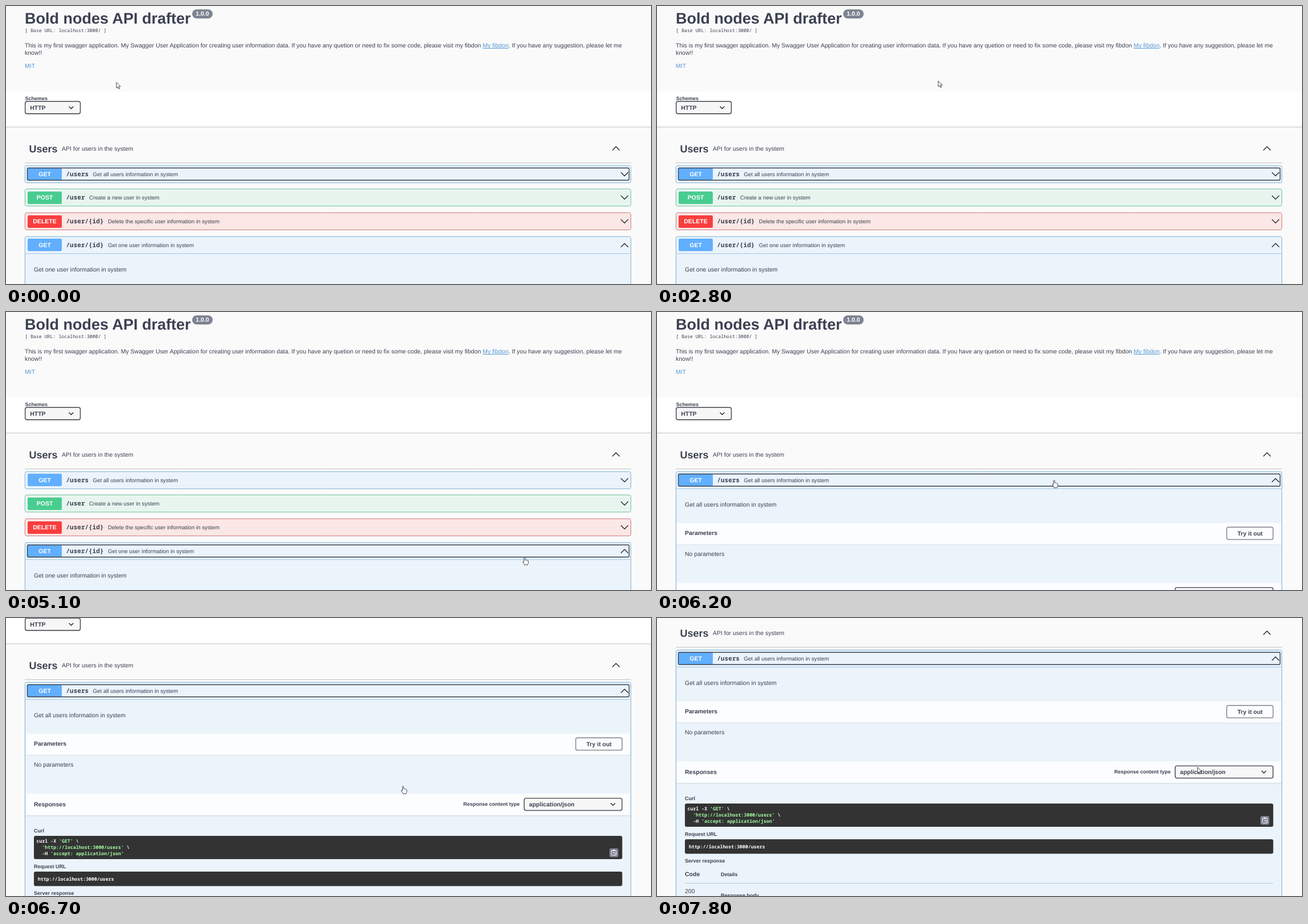
Recreate the animation shown at these times as an HTML page with a canvas. Size 1133 by 490 pixels, loop 8 s.

```html
<!DOCTYPE html>
<html lang="en">
<head>
<meta charset="utf-8">
<title>Users API</title>
<style>
  html, body { margin: 0; width: 100%; height: 100%; overflow: hidden; background: #fafafa; }
  canvas { display: block; }
</style>
</head>
<body>
<canvas id="stage" width="1133" height="490"></canvas>
<script>
const ctx = document.getElementById('stage').getContext('2d');
const LOOP = 8000, TICK = 100;
const SANS = '"Liberation Sans", Arial, sans-serif';
const MONO = '"Noto Sans Mono", "DejaVu Sans Mono", monospace';
const INK = '#3b4151', LINK = '#5597d6', CODE = '#a2fca2', DARK = '#333333';
const LEFT = 33.5, RIGHT = 1097.5, LIST_TOP = 281, ROW_STEP = 41.75;

const COLORS = {
  GET: ['#61affe', '#ebf3fb', '#82bbe0'],
  POST: ['#49cc90', '#e8f5ef', '#74cba5'],
  DELETE: ['#f93e3e', '#fbe7e5', '#d97f80']
};
const ROWS = [
  ['GET', '/users', 'Get all users information in system'],
  ['POST', '/user', 'Create a new user in system'],
  ['DELETE', '/user/{id}', 'Delete the specific user information in system'],
  ['GET', '/user/{id}', 'Get one user information in system']
];

// Each pointer move: start and end time, then where it comes to rest
const REST = { x: 194, y: 134.5 };
const MOVES = [
  { from: 100, to: 600, x: 84, y: 328 },
  { from: 700, to: 1500, x: 475.5, y: 86 },
  { from: 1900, to: 2400, x: 494, y: 132 },
  { from: 3000, to: 4700, x: 911, y: 432 },
  { from: 5500, to: 5800, x: 697.5, y: 296 },
  { from: 7100, to: 7800, x: 949.5, y: 263 }
];

const progress = (t, from, to) => Math.min(1, Math.max(0, (t - from) / (to - from)));
const smooth = p => p * p * (3 - 2 * p);
const mix = (a, b, p) => a + (b - a) * p;

const scrollAt = t => 225 * (1 - (1 - progress(t, 6200, 7000)) ** 1.4);

function pointerAt(t) {
  return MOVES.reduce((p, m) => {
    const k = smooth(progress(t, m.from, m.to));
    return { x: mix(p.x, m.x, k), y: mix(p.y, m.y, k) };
  }, REST);
}

// y is the middle of the capitals; returns the x where the text ends
function text(str, x, y, size, { bold, mono, color = INK, align = 'left' } = {}) {
  ctx.font = `${bold ? 'bold ' : ''}${size}px ${mono ? MONO : SANS}`;
  ctx.fillStyle = color;
  ctx.textAlign = align;
  ctx.fillText(str, x, Math.round(y + size * 0.358));
  return x + ctx.measureText(str).width;
}

function box(x, y, w, h, r, fill, stroke, line = 1) {
  ctx.beginPath();
  ctx.roundRect(x, y, w, h, r);
  if (fill) { ctx.fillStyle = fill; ctx.fill(); }
  if (stroke) { ctx.strokeStyle = stroke; ctx.lineWidth = line; ctx.stroke(); }
}

function shadowed(alpha, blur, dy, draw) {
  ctx.save();
  ctx.shadowColor = `rgba(0,0,0,${alpha})`;
  ctx.shadowBlur = blur;
  ctx.shadowOffsetY = dy;
  draw();
  ctx.restore();
}

function rule(x1, x2, y, color) {
  ctx.fillStyle = color;
  ctx.fillRect(x1, y, x2 - x1, 1);
}

function chevron(x, y, w, up) {
  const h = (up ? -w : w) / 4;
  ctx.beginPath();
  ctx.moveTo(x - w / 2, y - h);
  ctx.lineTo(x, y + h);
  ctx.lineTo(x + w / 2, y - h);
  ctx.strokeStyle = '#20242c';
  ctx.lineWidth = 1.4;
  ctx.lineCap = ctx.lineJoin = 'round';
  ctx.stroke();
}

function select(label, x, y, w) {
  shadowed(0.2, 2, 1, () => box(x, y, w, 21.5, 3, '#f7f7f7'));
  box(x, y, w, 21.5, 3, null, '#41444e', 1.4);
  text(label, x + 8.5, y + 10.6, 10.5, { bold: true });
  chevron(x + w - 16, y + 11, 7, false);
}

function header() {
  const end = text('Bold nodes API drafter', 33, 21.6, 27, { bold: true });
  box(end + 2.5, 6, 36, 16, 8, '#7d8492');
  text('1.0.0', end + 20.5, 13.6, 10.5, { bold: true, color: '#fff', align: 'center' });
  text('[ Base URL: localhost:3000/ ]', 33, 43.2, 8.25, { mono: true });

  const x = text('This is my first swagger application. My Swagger User Application for creating user ' +
    'information data. If you have any quetion or need to fix some code, please visit my fibdon ', 33, 69.2, 10.5);
  const x2 = text('My fibdon', x, 69.2, 10.5, { color: LINK });
  rule(x, x2, 74, LINK);
  text('. If you have any suggestion, please let me', x2, 69.2, 10.5);
  text('know!!', 33, 81.8, 10.5);
  text('MIT', 33, 105.6, 10.5, { color: LINK });

  shadowed(0.15, 1, 1, () => {
    ctx.fillStyle = '#fff';
    ctx.fillRect(-10, 151, 1153, 61.5);
  });
  text('Schemes', 33.5, 162.8, 9, { bold: true });
  select('HTTP', 33.7, 168.3, 96.8);

  text('Users', 40.5, 252, 18, { bold: true });
  text('API for users in the system', 98, 251.6, 10.5);
  chevron(1071.5, 251, 12, true);
  rule(33, 1098, 276, '#c0c1c5');
}

function row([method, path, note], top, { open, focus }) {
  const [main, tint, edge] = COLORS[method];
  const y = Math.floor(top), inner = Math.round(top + 4);
  const h = open ? 800 : 30, w = RIGHT - LEFT;
  shadowed(0.15, 3, 0, () => box(LEFT, y + 0.5, w, h, 3, '#fafafa'));
  box(LEFT, y + 0.5, w, h, 3, tint, edge);
  if (open) rule(LEFT, RIGHT, y + 30, '#9fc9ea');
  box(38, inner, 60, 22, 2, main);
  text(method, 68, y + 14.9, 10.5, { bold: true, color: '#fff', align: 'center' });
  const end = text(path, 105.5, y + 15.4, 11, { bold: true, mono: true });
  text(note, end + 7.4, y + 15.3, 9.75);
  chevron(1086.5, y + 15.5, 12, open);
  if (focus) box(37.5, inner + 0.5, 1057, 21.5, 2, null, '#37414f', 1.4);
  if (open) text(note, 49, y + 58, 10.5);
}

function bar(label, y) {
  shadowed(0.1, 2, 1, () => {
    ctx.fillStyle = '#fbfdfe';
    ctx.fillRect(LEFT + 0.5, y, RIGHT - LEFT - 1, 38);
  });
  text(label, 49, y + 18.3, 10.5, { bold: true });
}

function codeLine(parts, y) {
  parts.reduce((x, part) => text(part, x, y, 8.25, {
    bold: true, mono: true, color: part[0] === "'" ? CODE : '#fff'
  }), 53.5);
}

function clipboard(x, y) {
  box(x, y, 15.6, 15.6, 3, '#7d8293');
  box(x + 3.6, y + 3.8, 8.4, 8.6, 1, null, '#f2f3f5');
  box(x + 5.6, y + 2.4, 4.4, 2.6, 1, '#f2f3f5');
  rule(x + 5.5, x + 10, y + 7, '#f2f3f5');
  rule(x + 7.5, x + 13, y + 9.3, '#f2f3f5');
}

function details() {
  const bold = { bold: true };
  bar('Parameters', 371.4);
  shadowed(0.1, 2, 1, () => box(1000.8, 379.3, 81.4, 21.6, 3, '#fbfdfe'));
  box(1000.8, 379.3, 81.4, 21.6, 3, null, '#808288', 1.4);
  text('Try it out', 1041.7, 390.2, 10.5, { bold: true, align: 'center' });
  text('No parameters', 49, 426, 10.5);

  bar('Responses', 477.6);
  text('Response content type', 803.3, 496.2, 9, bold);
  select('application/json', 910.3, 485.6, 171.8);

  text('Curl', 49, 543.2, 9, bold);
  box(49, 552, 1033.5, 41, 3, DARK);
  codeLine(['curl -X ', "'GET'", ' \\'], 561.5);
  codeLine(['  ', "'http://localhost:3000/users'", ' \\'], 572.4);
  codeLine(['  -H ', "'accept: application/json'"], 583.2);
  clipboard(1060, 574);

  text('Request URL', 49, 605.6, 9, bold);
  box(49, 615, 1033.5, 25.5, 3, DARK);
  text('http://localhost:3000/users', 56, 627.6, 8.25, { bold: true, mono: true, color: '#fff' });

  text('Server response', 49, 653, 9, bold);
  text('Code', 49, 676.3, 10.5, bold);
  text('Details', 112, 677, 9, bold);
  rule(49, 1082.5, 692, '#b5cbdd');
  text('200', 49, 706.5, 10.5);
  text('Response body', 112, 713.6, 9, bold);
}

const ARROW = new Path2D('M0 0V10.2L2.4 8.1L4 11.8L5.6 11.1L4 7.5H7.2Z');
const HAND = new Path2D('M-1.1 8.2V1.1Q0 -.6 1.1 1.1V5.2Q2.4 4.4 3 5.6Q4.4 4.9 4.9 6.1' +
  'Q6.5 5.7 6.5 7.4V10Q6.3 11.6 5.4 12.4V13.8H-.3V12.6L-3.2 8.8Q-3.4 7 -1.1 8.2Z');

function pointer({ x, y }) {
  const shape = y > LIST_TOP ? HAND : ARROW;
  ctx.save();
  ctx.translate(x, y);
  ctx.fillStyle = '#fff';
  ctx.strokeStyle = '#30343c';
  ctx.lineWidth = 0.9;
  ctx.lineJoin = 'round';
  ctx.fill(shape);
  ctx.stroke(shape);
  ctx.restore();
}

function draw(t) {
  const firstOpen = t >= 6200, lastOpen = t < 5500;
  const focused = t >= 5100 && !firstOpen ? 3 : 0;

  ctx.fillStyle = '#fafafa';
  ctx.fillRect(0, 0, 1133, 490);
  ctx.save();
  ctx.translate(0, -Math.round(scrollAt(t)));
  header();
  ROWS.slice(0, firstOpen ? 1 : 4).forEach((item, i) => row(item, LIST_TOP + i * ROW_STEP, {
    open: i === 0 ? firstOpen : i === 3 && lastOpen,
    focus: i === focused
  }));
  if (firstOpen) details();
  ctx.restore();
  pointer(pointerAt(t));
}

ctx.textRendering = 'geometricPrecision';
const start = performance.now();
function frame() {
  const t = (performance.now() - start) % LOOP;
  draw(Math.floor(t / TICK) * TICK);
  requestAnimationFrame(frame);
}
frame();
</script>
</body>
</html>
```
